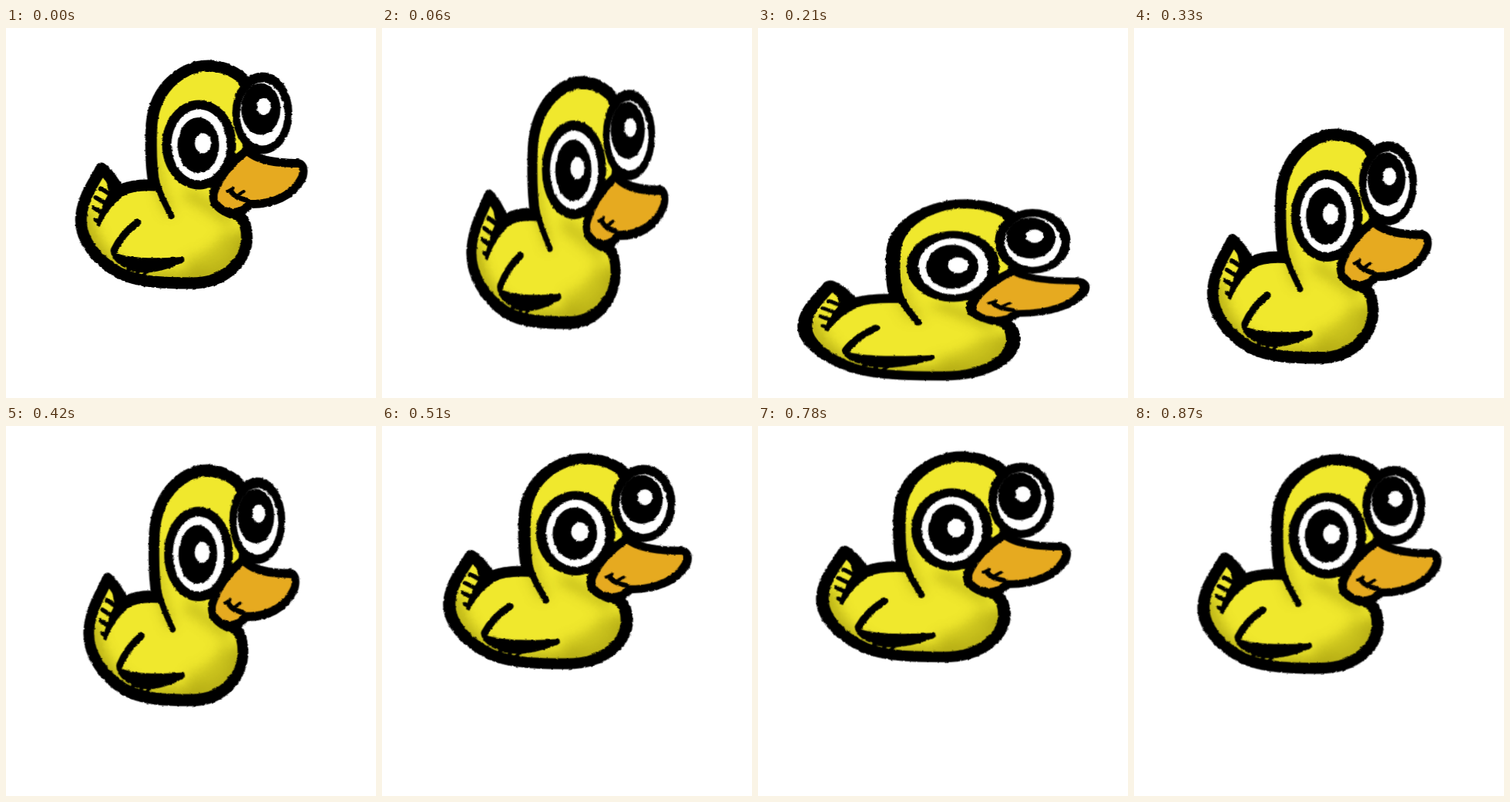
An HTML page for the animation above (900 ms loop, 480x480 px).

```html
<!DOCTYPE html>
<html lang="en">
<head>
<meta charset="utf-8">
<title>Bouncing duck</title>
<style>
  html, body { margin: 0; width: 100%; height: 100%; overflow: hidden; background: #fff; }
  svg { display: block; width: 100vw; height: 100vh; }
  .line { fill: none; stroke: #000; stroke-linecap: round; stroke-linejoin: round; }
  .shade { fill: none; stroke: #857d00; }
</style>
</head>
<body>
<svg viewBox="0 0 480 480">
  <defs>
    <path id="body" d="M123 182 C117 196 100 216 97 244 C94 275 119 303 147 318
      C171 330 205 331 240 331 C286 331 312 300 312 272 C312 258 309 250 303 243
      C296 225 300 205 308 180 C318 150 318 100 307 66 C293 54 277 49 262 49
      C241 49 224 59 211 72 C195 89 188 110 188 135 C187 165 188 185 192 204
      C175 203 160 205 147 211 C140 204 135 190 123 182 Z"/>
    <clipPath id="inside"><use href="#body"/></clipPath>
    <filter id="soft" x="-30%" y="-30%" width="160%" height="160%"><feGaussianBlur stdDeviation="8"/></filter>
    <filter id="rough" filterUnits="userSpaceOnUse" x="70" y="25" width="340" height="330" color-interpolation-filters="sRGB">
      <feTurbulence type="fractalNoise" baseFrequency=".22" numOctaves="2" seed="4"/>
      <feDisplacementMap in="SourceGraphic" scale="3" xChannelSelector="R" yChannelSelector="G"/>
    </filter>
  </defs>
  <g id="duck" filter="url(#rough)">
    <use href="#body" fill="#f0e82d"/>
    <g clip-path="url(#inside)">
      <g class="shade" filter="url(#soft)">
        <path d="M101 235 C101 280 130 310 165 326 H245 C285 326 310 298 312 262" stroke-width="22" opacity=".5"/>
        <path d="M235 312 Q282 300 294 266" stroke-width="24" opacity=".35"/>
        <path d="M232 214 Q262 228 292 252" stroke-width="14" opacity=".4"/>
        <path d="M190 140 Q190 190 212 240" stroke-width="9" opacity=".5"/>
      </g>
    </g>
    <use href="#body" class="line" stroke-width="15"/>

    <path d="M128 192 L150 204 L168 210 Q136 222 121 258 L117 256 Q120 236 133 214 Z"/>
    <g class="line">
      <path d="M190 175 C193 205 203 222 214 244" stroke-width="8"/>
      <path d="M135 216 L122 208 M128 227 L116 220 M123 239 L113 233 M119 251 L116 249" stroke-width="5.500"/>
      <path d="M170 252 Q149 268 140 288" stroke-width="9.500"/>
      <path d="M160 312 L155 319 M172 314 L168 321 M184 314 L179 320" stroke-width="5"/>
    </g>
    <path d="M135 288 C148 298 185 300 228 297 Q234 300 228 305 C205 315 180 322 161 314 C147 309 136 301 135 288 Z"/>

    <ellipse cx="250" cy="151.500" rx="48" ry="58"/>
    <ellipse cx="332" cy="110.500" rx="39" ry="53"/>
    <g fill="#fff">
      <ellipse cx="250" cy="151.500" rx="36" ry="46"/>
      <ellipse cx="332" cy="111.500" rx="29" ry="41"/>
    </g>
    <ellipse cx="249" cy="152" rx="27" ry="36"/>
    <ellipse cx="330" cy="105" rx="25.500" ry="33.500"/>
    <g fill="#fff">
      <ellipse cx="255" cy="149.500" rx="10.500" ry="13"/>
      <ellipse cx="334" cy="102" rx="9" ry="11"/>
    </g>

    <path d="M312 166 C326 177 350 181 378 181 Q381 183 379 191 C368 213 345 224 313 223
      Q306 234 294 234 C279 233 271 222 275 213 C281 196 296 178 312 166 Z"
      fill="#e6aa20" stroke="#000" stroke-width="22" stroke-linejoin="round" paint-order="stroke"/>
    <g class="line">
      <path d="M270 228 Q283 243 308 246" stroke-width="10"/>
      <path d="M287 212 L294 208 M298 218 L308 212" stroke-width="4"/>
      <path d="M292 212 Q295 220 311 223" stroke-width="6.500"/>
    </g>
  </g>
</svg>
<script>
  const STEP = 30, STEPS = 30;
  // [width, bottom edge] from the top of the hop to the landing
  const poses = [
    [336, 300], [334.5, 301], [331, 303], [328, 306], [324.5, 310],
    [320, 315], [314, 321], [299, 338], [278, 363], [260, 390],
    [263, 415], [289, 435], [334, 447], [364, 454], [376, 457]
  ];
  const duck = document.getElementById('duck');

  // The way up mirrors the way down
  function poseAt(k) {
    if (k < 8) return poses[k + 7];
    return poses[k < 23 ? 22 - k : k - 23];
  }

  function draw(now) {
    const [w, bottom] = poseAt(Math.floor(now / STEP) % STEPS);
    const h = 235 + 0.8 * (376 - w);
    duck.setAttribute('transform',
      `translate(240 ${bottom}) scale(${w / 299} ${h / 296.6}) translate(-239.5 -338)`);
  }

  const start = performance.now();
  function tick() {
    draw(performance.now() - start);
    requestAnimationFrame(tick);
  }
  tick();
</script>
</body>
</html>
```
